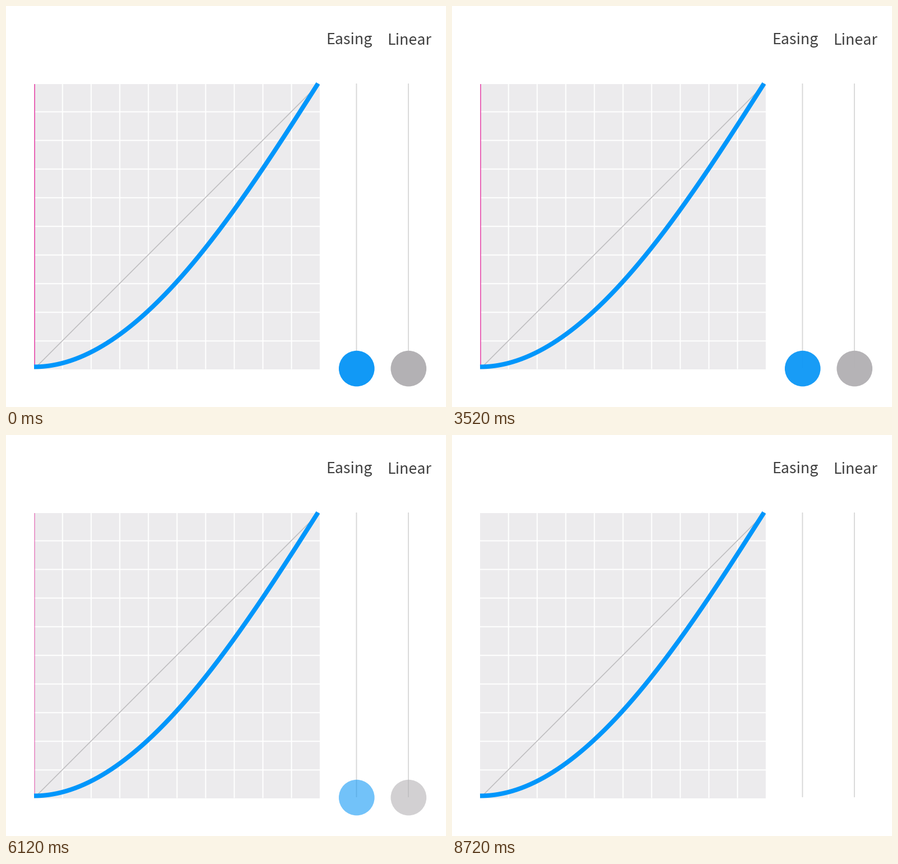
Recreate the animation shown at these times as a matplotlib script. Size 784x714 px, loop 8.8 s.

```python
import numpy as np
import matplotlib.pyplot as plt
from matplotlib.animation import FuncAnimation
from matplotlib.patches import Circle, Rectangle

W, H, DPI = 784, 714, 64
PX = 72 / DPI
STEP, LOOP = 40, 8800

LEFT, RIGHT, TOP, BOTTOM = 50, 559, 138.5, 646.5
BLUE, PINK = "#0096fb", "#e85fb4"

# Start of each run of the dots, and timings relative to it (ms)
STARTS = (1343, 4116, 6893)
MOVE, FADE = 400, 400
FADE_IN, FADE_OUT = -910, 985


def bezier(x1, y1, x2, y2, n=200):
    """Sampled easing curve from (0, 0) to (1, 1)."""
    t = np.linspace(0, 1, n)
    a, b = 3 * (1 - t) ** 2 * t, 3 * (1 - t) * t ** 2
    return a * x1 + b * x2 + t ** 3, a * y1 + b * y2 + t ** 3


CURVE = bezier(0.36, 0, 0.70, 0.527)
EASE = bezier(0.25, 0.1, 0.25, 1)


def ramp(t, start, length):
    return min(max((t - start) / length, 0), 1)


def fade(t, start):
    return np.interp(ramp(t, start, FADE), *EASE)


def state(t):
    """Linear progress and opacity of the moving parts."""
    run = sum(t >= s + FADE_IN for s in STARTS[1:])
    start = STARTS[run]
    shown = 1 if run == 0 else fade(t, start + FADE_IN)
    return ramp(t, start, MOVE), shown * (1 - fade(t, start + FADE_OUT))


fig = plt.figure(figsize=(W / DPI, H / DPI), dpi=DPI, facecolor="white")
ax = fig.add_axes([0, 0, 1, 1])
ax.set(xlim=(0, W), ylim=(H, 0))
ax.axis("off")


def line(xs, ys, color, width, z):
    return ax.plot(xs, ys, color=color, lw=width * PX, zorder=z,
                   solid_capstyle="butt", snap=False)[0]


def dot(x, color):
    return ax.add_patch(Circle((x, 645.6), 31.8, fc=color, lw=0, zorder=6))


def label(x, y, text):
    ax.text(x, y, text, family="Noto Sans CJK JP", size=26.8 * PX,
            color="#404040", va="baseline")


# Chart
ax.add_patch(Rectangle((LEFT, TOP), RIGHT - LEFT, BOTTOM - TOP,
                       fc="#ecebed", lw=0, zorder=1))
for k in range(9):
    x, y = 100.7 + 51 * k, 188.4 + 51 * k
    line([x, x], [TOP, BOTTOM], "white", 2, 2)
    line([LEFT, RIGHT], [y, y], "white", 2, 2)
line([LEFT + 0.5, RIGHT - 1], [BOTTOM - 0.5, TOP], "#bfbdc0", 1.6, 3)
line(50 + 506 * CURVE[0], 642.5 - 504.5 * CURVE[1], BLUE, 8, 5)

# Tracks and labels
for x in (624.5, 717):
    line([x, x], [138, 645], "#d6d6d6", 1.8, 3)
label(569.9, 67.6, "Easing")
label(678.8, 68.6, "Linear")

marker = line([51, 51], [139, 646], PINK, 1.9, 4)
eased = dot(624.8, "#1199f6")
linear = dot(717.3, "#b3b1b4")


def update(i):
    p, alpha = state(i * STEP)
    marker.set_xdata([51 + 506.5 * p] * 2)
    eased.center = 624.8, 645.6 - 507.2 * np.interp(p, *CURVE)
    linear.center = 717.3, 645.6 - 507.2 * p
    for part in (marker, eased, linear):
        part.set_alpha(alpha)
    return marker, eased, linear


anim = FuncAnimation(fig, update, frames=LOOP // STEP, interval=STEP,
                     repeat=True, repeat_delay=0, blit=False)
plt.show()
```
